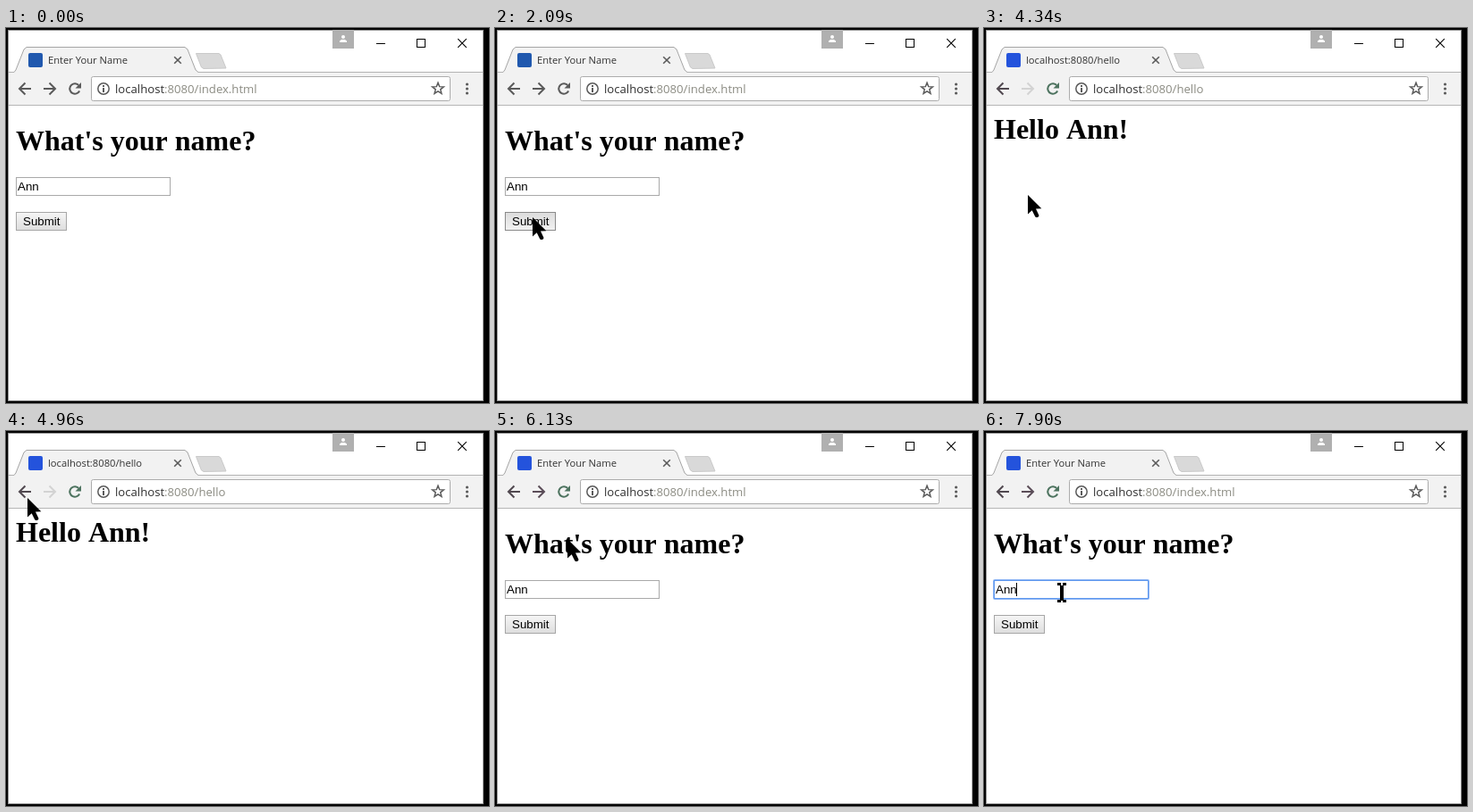
Recreate the animation shown at these times as an HTML page with a canvas. Size 540 px wide and 420 px high, loop 8000 ms.

```html
<!DOCTYPE html>
<html lang="en">
<head>
<meta charset="utf-8">
<title>Enter Your Name</title>
<style>
html, body { margin: 0; width: 100%; height: 100%; overflow: hidden; background: #000; }
canvas { display: block; width: 540px; height: 420px; }
</style>
</head>
<body>
<canvas id="stage" width="540" height="420"></canvas>
<script>
const ctx = document.getElementById('stage').getContext('2d');
const LOOP = 8000;
const NAME = 'Ann';
const UI = '"Open Sans", "Noto Sans", sans-serif';
const SANS = '"Liberation Sans", Arial, sans-serif';
const SERIF = '"Liberation Serif", "Times New Roman", serif';
const INK = '#5a5a5a';

function box(x, y, w, h, color) {
  ctx.fillStyle = color;
  ctx.fillRect(x, y, w, h);
}

function frame(x, y, w, h, color) {
  ctx.strokeStyle = color;
  ctx.lineWidth = 1;
  ctx.strokeRect(x + 0.5, y + 0.5, w - 1, h - 1);
}

function path(points, close) {
  ctx.beginPath();
  points.forEach(([x, y], i) => i ? ctx.lineTo(x, y) : ctx.moveTo(x, y));
  if (close) ctx.closePath();
}

function line(points, color, width = 1, close = false) {
  path(points, close);
  ctx.strokeStyle = color;
  ctx.lineWidth = width;
  ctx.stroke();
}

function shape(points, color) {
  path(points, true);
  ctx.fillStyle = color;
  ctx.fill();
}

function dot(x, y, r, color) {
  ctx.beginPath();
  ctx.arc(x, y, r, 0, 7);
  ctx.fillStyle = color;
  ctx.fill();
}

function text(str, x, y, font, color) {
  ctx.font = font;
  ctx.fillStyle = color;
  ctx.fillText(str, x, y);
  return ctx.measureText(str).width;
}

function rounded(x, y, w, h, r) {
  ctx.beginPath();
  ctx.roundRect(x, y, w, h, r);
}

function cross(x, y, r, color, width) {
  line([[x - r, y - r], [x + r, y + r]], color, width);
  line([[x - r, y + r], [x + r, y - r]], color, width);
}

// dir is 1 for a left arrow and -1 for a right one
function navArrow(x, dir, color) {
  line([[x - 6 * dir, 68], [x + 7 * dir, 68]], color, 2);
  line([[x + 0.5 * dir, 61.5], [x - 6 * dir, 68], [x + 0.5 * dir, 74.5]], color, 2);
}

function reload(color) {
  ctx.beginPath();
  ctx.arc(77, 68, 5.7, 0.45, 5.5);
  ctx.strokeStyle = color;
  ctx.lineWidth = 2;
  ctx.stroke();
  shape([[84, 61], [84, 67.5], [77.5, 67.5]], color);
}

function star(x, y) {
  const pts = [];
  for (let i = 0; i < 10; i++) {
    const a = i * Math.PI / 5 - Math.PI / 2, r = i % 2 ? 2.9 : 6.7;
    pts.push([x + r * Math.cos(a), y + r * Math.sin(a)]);
  }
  line(pts, INK, 1.5, true);
}

function titleBar(title, iconColor) {
  box(2, 2, 532, 416, '#8c8c8c');
  box(3, 3, 530, 414, '#fff');
  box(3, 50, 530, 36, '#f2f2f2');
  box(3, 49, 530, 1, '#b2b2b2');
  box(3, 86, 530, 1, '#b6b6b6');

  const tab = [[9, 49.5], [11, 47], [20, 24], [23, 21.5], [200, 21.5], [203, 24], [212, 47], [215, 49.5]];
  shape([...tab, [215, 51], [9, 51]], '#f2f2f2');
  line(tab, '#a5a5a5');
  rounded(25, 28, 16, 16, 2);
  ctx.fillStyle = iconColor;
  ctx.fill();
  text(title, 47, 40, '11.2px ' + UI, '#333');
  cross(192, 36, 3.8, INK, 1.6);

  const plus = [[212.5, 28.5], [238, 28.5], [240, 30], [246, 45], [221, 45.5], [218.5, 44]];
  shape(plus, '#d9d9d9');
  line(plus, '#cacaca', 1, true);

  box(365, 2, 24, 21, '#b0b0b0');
  dot(377, 10, 2, '#fff');
  shape([[373, 16], [373, 14.5], [375, 13], [379, 13], [381, 14.5], [381, 16]], '#fff');
  box(414, 17, 10, 1, '#000');
  frame(459, 12, 10, 10, '#000');
  cross(510, 17, 4.8, '#000', 1.1);
}

function toolbar(s) {
  if (s.circle) dot(21, 68, 16.3, s.circle);
  navArrow(21, 1, s.visited ? '#514950' : INK);
  navArrow(49, -1, s.hello ? '#d3d3d3' : s.visited ? '#5b4d58' : INK);
  reload(s.visited ? '#4d735f' : INK);

  rounded(95.5, 54.5, 401, 27, 2);
  ctx.fillStyle = '#fff';
  ctx.fill();
  ctx.strokeStyle = '#acacac';
  ctx.lineWidth = 1;
  ctx.stroke();

  ctx.beginPath();
  ctx.arc(109, 68, 6.2, 0, 7);
  ctx.strokeStyle = INK;
  ctx.lineWidth = 1.5;
  ctx.stroke();
  box(108, 64, 2, 2, INK);
  box(108, 67, 2, 5, INK);

  const font = '13.15px ' + UI;
  const w = text('localhost', 122, 73, font, '#303030');
  text(s.hello ? ':8080/hello' : ':8080/index.html', 122 + w, 73, font, '#8b8b82');
  star(483, 68);
  [63, 68, 73].forEach(y => dot(515.5, y, 1.6, INK));
}

function button(state) {
  const shades = state === 'down' ? ['#dcdcdc', '#f2f2f2'] : ['#f6f6f6', '#dddddd'];
  const g = ctx.createLinearGradient(0, 206, 0, 227);
  g.addColorStop(0, shades[0]);
  g.addColorStop(1, shades[1]);
  box(11, 206, 57, 21, g);
  frame(11, 206, 57, 21, state ? '#8a8a8a' : '#a6a6a6');
  text('Submit', 19, 221, '13.33px ' + SANS, '#000');
}

function page(s) {
  const big = 'bold 32px ' + SERIF;
  if (s.hello) {
    text('Hello ' + NAME + '!', 11, 124, big, '#000');
    return;
  }
  text("What's your name?", 11, 137, big, '#000');
  if (s.focus) {
    rounded(10.5, 166.5, 174, 22, 1);
    ctx.strokeStyle = '#8db5f5';
    ctx.lineWidth = 1;
    ctx.stroke();
  }
  frame(11, 167, 173, 21, s.focus ? '#5e98ee' : '#a9a9a9');
  text(NAME, 13, 182, '13.33px ' + SANS, '#000');
  if (s.caret) box(36, 170, 1, 15, '#000');
  button(s.button);
}

function pointer(x, y) {
  shape([[0, 0], [0, 21.5], [4.7, 17.3], [8.3, 24.6], [10, 25.3], [12.2, 24.2],
         [12.4, 22.8], [9, 15.6], [15.3, 15.2]].map(p => [x + p[0], y + p[1]]), '#000');
}

function beam(x, y) {
  box(x - 2, y - 8, 4, 17, '#000');
  for (const top of [y - 11, y + 8]) {
    box(x - 5, top, 4, 3, '#000');
    box(x + 1, top, 4, 3, '#000');
  }
}

// Which of n evenly timed steps, 1 to n, has been reached
const step = (t, from, to, n) =>
  Math.max(0, Math.min(n, 1 + Math.floor((t - from + 5) / ((to - from) / (n - 1)))));

function curve(a, c, b, u) {
  const v = 1 - u;
  return [0, 1].map(i => Math.round(v * v * a[i] + 2 * u * v * c[i] + u * u * b[i]));
}

function cursorAt(t) {
  if (t < 80) return null;
  if (t < 710) return curve([106, 403], [94, 300], [72, 255], (step(t, 80, 540, 7) - 1) / 6);
  if (t < 1230) return curve([72, 255], [58, 239], [47, 227], step(t, 710, 850, 3) / 3);
  if (t < 4340) return t < 1310 ? [45, 219] : [42, 212];
  if (t < 5970) return curve([49, 187], [56, 130], [24, 75], (step(t, 4340, 4960, 9) - 1) / 8);
  if (t < 6660) {
    const u = step(t, 5970, 6600, 9) / 9;
    return curve([24, 75], [135, 150], [89, 185], u);
  }
  return t < 6750 ? [88, 183] : [87, 181];
}

function stateAt(t) {
  const hello = t >= 2170 && t < 5500;
  return {
    hello,
    visited: t >= 2170,
    circle: t >= 5350 && t < 5590 ? (t < 5430 ? '#e2e2e2' : '#d6d6d6') : null,
    button: t >= 2090 && t < 2170 ? 'down' : t >= 1230 && t < 2090 ? 'hover' : '',
    focus: t >= 6910,
    caret: t >= 6910 && (t < 7440 || t >= 7900)
  };
}

function draw(now) {
  const t = now % LOOP;
  const s = stateAt(t);
  box(0, 0, 540, 420, '#000');
  titleBar(s.hello ? 'localhost:8080/hello' : 'Enter Your Name', s.visited ? '#2453dc' : '#2058ae');
  toolbar(s);
  page(s);
  const c = cursorAt(t);
  if (c) (t > 5970 && c[1] >= 167 ? beam : pointer)(c[0], c[1]);
  requestAnimationFrame(draw);
}
requestAnimationFrame(draw);
</script>
</body>
</html>
```
